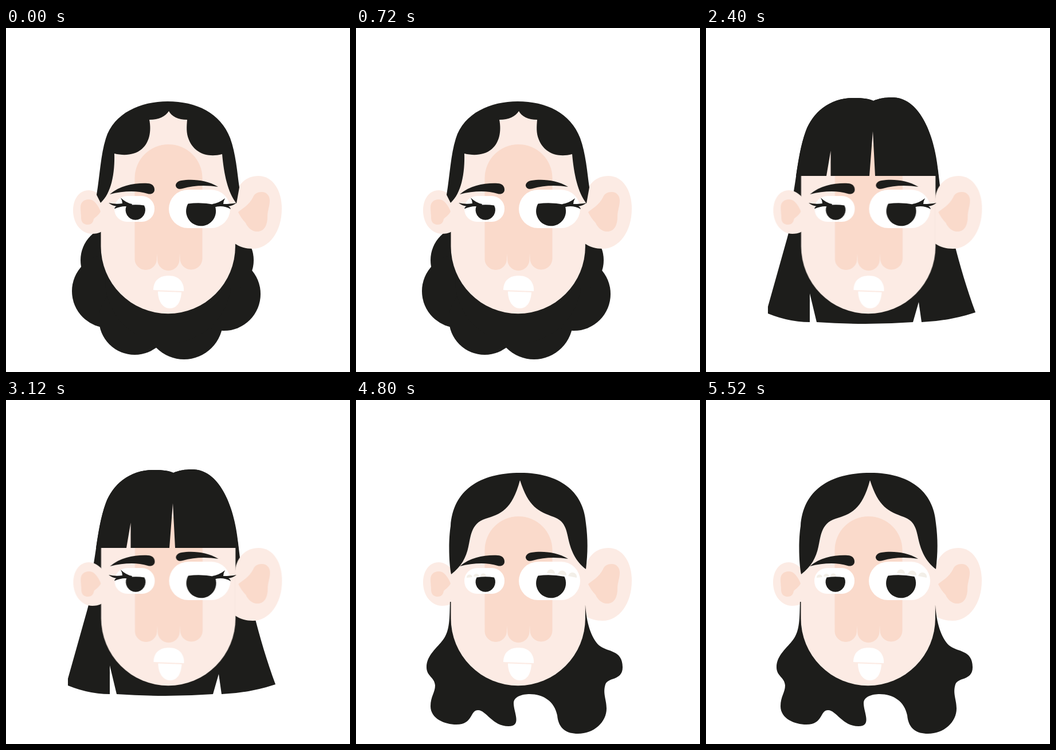
Recreate the animation shown at these times as an HTML page. Size 600x600 px, loop 6000 ms.

```html
<!DOCTYPE html>
<html lang="en">
<head>
<meta charset="utf-8">
<title>Hairstyles</title>
<style>
  html, body { margin: 0; width: 100%; height: 100%; overflow: hidden; background: #fff; }
  svg { display: block; width: 100%; height: 100%; }

  .skin { fill: #fcebe4; }
  .blush { fill: #fadacb; }
  .ink { fill: #1d1d1b; }
  .white { fill: #fff; }
  .lid { fill: #f3efe8; }

  /* Five looks, each held for 1.2s */
  .look {
    visibility: hidden;
    animation: show 6s step-end infinite;
    animation-delay: calc(var(--i) * 1.2s - 6s);
  }
  .face { animation: nudge 6s step-end infinite; }

  @keyframes show {
    0% { visibility: visible; }
    20%, 100% { visibility: hidden; }
  }
  @keyframes nudge {
    0%, 80%, 100% { transform: translateX(0); }
    20%, 60% { transform: translateX(1px); }
    40% { transform: translateX(.4px); }
  }
</style>
</head>
<body>
<svg viewBox="0 0 600 600">
  <defs>
    <g id="lashes" class="ink">
      <path d="M179 305Q191 308 203 306Q203 301 200 296Q209 305 220 307L218 313Q206 308 189 315.500Q190 311 193 311Q185 310 179 305Z"/>
      <path d="M402 305Q392 307 379 307Q379 302 382 297Q372 305 360 307L362 313Q378 308 392 316Q391 312 388 311Q396 310 402 305Z"/>
    </g>
  </defs>

  <!-- hair behind the ears -->
  <g class="look ink" style="--i:0">
    <circle cx="190" cy="405" r="60"/>
    <circle cx="179" cy="459" r="64"/>
    <circle cx="224.500" cy="507.500" r="62.500"/>
    <circle cx="310.500" cy="510" r="68"/>
    <circle cx="380" cy="464" r="64"/>
    <circle cx="372" cy="405" r="60"/>
    <circle cx="283" cy="440" r="110"/>
  </g>
  <path class="look ink" style="--i:2" d="M292 127C280 122 268 122 257 122C215 122 186 148 174 180C163 210 158 255 153 285C150 320 148 345 142 365L108 486V498Q145 513 181 513V463L193 513Q278 519 361 513L371 478L376 513Q425 511 470 496C455 455 443 415 433 375C420 340 410 300 405 250C398 180 370 121 325 121C312 121 301 123 292 127Z"/>

  <g class="face">
    <path class="skin" d="M168 296C160 287 152 283 144 283C128 283 117 298 117 318C117 342 132 359 150 359C156 359 161 358 167 355Z"/>
    <path class="blush" d="M130 313C130 304 136 299 144 299C148 299 151 300 153 302C157 305 162 312 165 320C162 326 156 330 153 333C152 340 148 343 142 343C135 343 131 338 131 331C131 325 130 320 130 313Z"/>
    <path class="skin" d="M399 298C402 272 420 258 440 258C466 258 481 284 481 315C481 355 459 385 430 385C418 385 408 382 399 376Z"/>
    <path class="blush" d="M405 321C413 314 424 309 431 295C433 289 439 286 446 286C454 286 460 292 460 301C460 311 456 318 456 329C456 345 450 355 438 355C428 355 421 347 418 340C414 336 408 328 405 321Z"/>
  </g>

  <!-- long waves fall over the ears -->
  <path class="look ink" style="--i:4" d="M164 352C163 380 164 402 152 418C142 432 123 445 123 466C123 482 137 483 138 498C138 510 130 517 130 534C130 556 155 566 175 566C205 566 198 541 213 541C227 541 238 569 266 569C290 569 275 545 275 529C275 517 290 513 303 513C326 513 346 525 351 550C353 574 368 582 387 582C415 582 437 562 437 538C437 522 430 512 435 496C440 483 465 490 465 466C465 435 438 440 424 428C410 415 402 388 400 358Z"/>

  <g class="face">
    <path class="skin" d="M165.500 260a117.200 117.200 0 0 1 234.400 0V381a117.200 117.200 0 0 1 -234.400 0Z"/>
    <path class="blush" d="M224.500 262a59 59 0 0 1 118 0V402a19.500 19.500 0 0 1 -39 0L303 393L302.500 404a19.200 19.200 0 0 1 -38.400 0L263.500 393L263 404a19.300 19.300 0 0 1 -38.500 0Z"/>
    <rect class="white" x="189" y="293" width="70" height="45" rx="22"/>
    <rect class="white" x="284" y="282" width="107" height="67" rx="33.500"/>
    <path class="ink" d="M210.500 309.500Q226 307 241 309.500A17.200 17.200 0 1 1 210.500 309.500Z"/>
    <path class="ink" d="M317.500 306.500Q340 303.500 363.500 308A26 26 0 1 1 317.500 306.500Z"/>
    <path class="white" d="M257 457C257 440 268 432 284 432C301 432 311 443 310 459Z"/>
    <path class="white" d="M265 459.500L306 461C305 478 298 489 286 489C273 489 265 476 265 459.500Z"/>
  </g>

  <!-- hair in front -->
  <path class="look ink" style="--i:0" d="M158 291C164 255 165 222 174 193C188 148 235 128 282 128C332 128 374 148 391 192C401 220 403 250 407 278L402 306C387 287 380 255 377 220C350 227 328 217 319 195C314 183 315 172 316 160C300 160 289 154 284 145C278 154 267 160 250 160C254 180 250 200 237 211C224 222 206 223 189 219C190 253 184 288 165 305Z"/>

  <g class="look ink" style="--i:1">
    <path d="M165 303C163 270 165 235 168 215C175 160 222 127 284 127C345 127 395 160 401 215C405 240 403 275 402 297C385 282 378 255 377 220C350 226 328 217 319 195C314 183 315 172 316 159C300 159 289 153 284 144C278 153 267 159 251 159C255 180 251 199 238 210C224 221 206 222 189 218C190 253 184 284 165 303Z"/>
    <circle cx="161" cy="154" r="45"/>
    <circle cx="200" cy="145" r="26"/>
    <circle cx="160" cy="201" r="27"/>
    <circle cx="405" cy="155" r="44.500"/>
    <circle cx="367" cy="146" r="25"/>
    <circle cx="407" cy="203" r="26"/>
  </g>

  <path class="look ink" style="--i:2" d="M157 258H210L217.500 214V258H285L291 180L295 258H405.500C398 180 370 121 325 121C312 121 301 123 292 127C280 122 268 122 257 122C215 122 186 148 174 180C165 204 161 232 157 258Z"/>

  <g class="look" style="--i:3">
    <circle class="ink" cx="280.500" cy="107" r="76.500"/>
    <path class="ink" d="M166 356C161 320 159 280 161 250C164 200 180 158 212 137C250 115 315 115 352 131C385 157 402 205 406 262C406 300 404 330 401 356L400 258H295L292 181L286 258H219V215L211 258H167Z"/>
    <path class="white" d="M226 130Q280 101 331 125Q280 113 226 130Z"/>
  </g>

  <path class="look ink" style="--i:4" d="M166 304C162 285 161 245 165 220C169 158 215 127 287 127C353 127 397 158 401 215C405 245 404 270 401 295C383 282 375 262 371 245C367 225 364 211 345 204C318 194 301 187 286 140C272 192 252 199 226 207C200 215 200 240 196 256C192 275 184 290 166 304Z"/>

  <g class="face ink">
    <path d="M181 290C200 274 225 270 247 271C255 271 259 276 259 282C259 288 253 291 247 289C228 283 205 284 181 290Z"/>
    <path d="M370 277C350 265 325 263 306 266C299 267 296 271 296 275C297 280 302 282 308 280C328 274 350 274 370 277Z"/>
  </g>

  <!-- eye make-up -->
  <use class="look" style="--i:0" href="#lashes"/>
  <use class="look" style="--i:2" href="#lashes"/>
  <g class="look ink" style="--i:1">
    <path d="M174 314C190 311 205 306 226 306C242 307 253 311 259 316C245 311 235 310 222 310C205 311 192 318 174 314Z"/>
    <path d="M285 315C300 305 325 301 345 302C370 303 388 311 410 313C398 317 388 316 378 313C350 304 310 305 285 315Z"/>
  </g>
  <g class="look lid" style="--i:4">
    <path d="M193 310a5 5 0 0 1 10 -1Z"/>
    <path d="M205 308a5 5 0 0 1 10 0Z"/>
    <path d="M217 307a5 5 0 0 1 10 1Z"/>
    <path d="M333 302a7 7 0 0 1 14 1Z"/>
    <path d="M352 304a7.500 7.500 0 0 1 15 2Z"/>
    <path d="M370 307a7.500 7.500 0 0 1 15 3Z"/>
  </g>
</svg>
</body>
</html>
```
